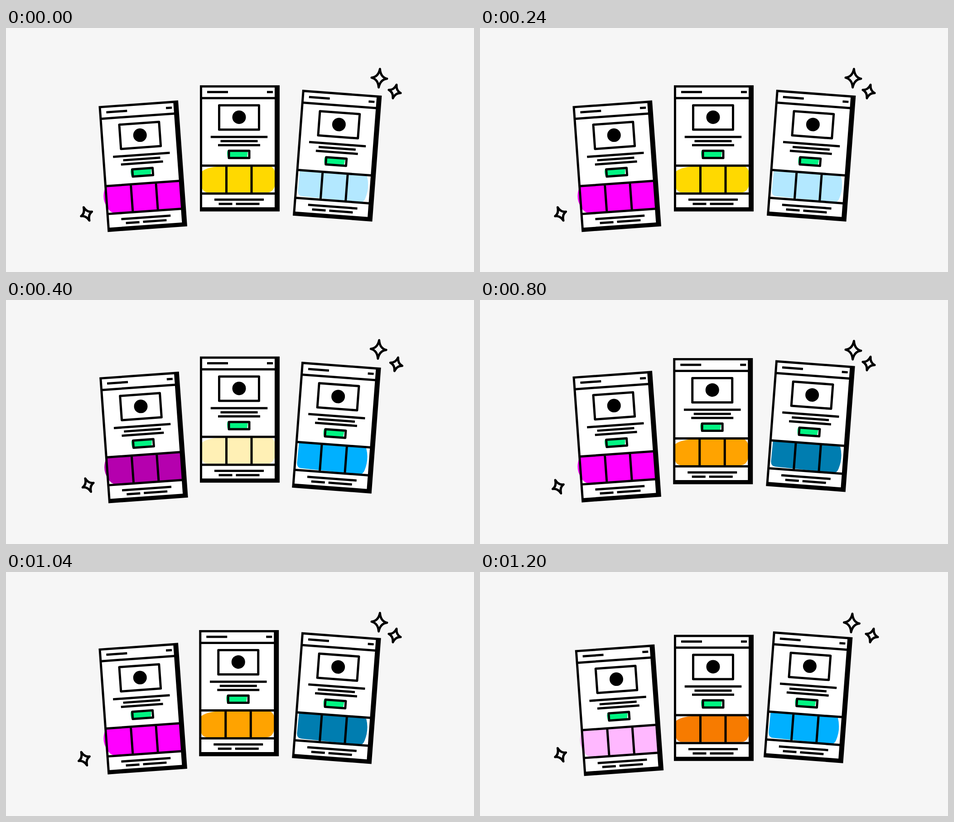
Recreate the animation shown at these times as an HTML page. Size 1033 px wide and 542 px high, loop 1600 ms.

```html
<!DOCTYPE html>
<html lang="en">
<head>
<meta charset="utf-8">
<title>Page templates</title>
<style>
  html, body { margin: 0; width: 100%; height: 100%; overflow: hidden; background: #f6f6f6; }
  svg { display: block; width: 100%; height: 100%; }
  .ink { fill: none; stroke: #000; stroke-width: 5; stroke-linejoin: round; }
</style>
</head>
<body>
<svg id="stage" viewBox="0 0 1033 542"></svg>
<script>
const STEP = 400;    // time per pose, ms
const UNIT = 1.75;   // size of one jitter unit, px
const W = 176, H = 280.4, MID = 86.5;
const stage = document.getElementById('stage');

function add(parent, tag, attrs = {}) {
  const node = document.createElementNS('http://www.w3.org/2000/svg', tag);
  for (const key in attrs) node.setAttribute(key, attrs[key]);
  return parent.appendChild(node);
}

const ink = (parent, d, extra) => add(parent, 'path', { class: 'ink', d, ...extra });
const bar = (y, w, x = MID - w / 2) => `M${x} ${y}h${w}`;
const box = (y, w, h) => bar(y, w) + `v${h}h${-w}z`;

// Four tips joined by curves that sag to the centre.
function starPath(rx, ry) {
  return `M0 ${-ry}Q0 0 ${rx} 0Q0 0 0 ${ry}Q0 0 ${-rx} 0Q0 0 0 ${-ry}Z`
    .replaceAll('Q0 0', () => 'Q' + sag.next().value);
}
const sag = (function* () {
  while (true) yield* ['2.5 -2.5', '2.5 2.5', '-2.5 2.5', '-2.5 -2.5'];
})();

function drawPage(card, blob) {
  add(card, 'rect', { x: 2, y: 2, width: W - 6, height: H - 6, fill: '#fff' });
  const fill = add(card, 'path', { d: blob });
  add(card, 'path', { d: `M0 0H${W}V${H}H0ZM5 5V271H165V5Z`, 'fill-rule': 'evenodd' });
  add(card, 'path', { d: 'M62 144Q58.5 148 61 160L104 161L106 146Z', fill: '#00f582' });

  let d = bar(15, 46, 16) + bar(15, 13, 148);
  for (const y of [28.5, 178.5, 240.5]) d += bar(y, 164, 3);
  for (const x of [58.5, 114]) d += `M${x} 178v63`;
  d += bar(114.7, 125.5) + bar(124, 82) + bar(133, 93) + bar(254, 109);
  ink(card, d + box(44.5, 88, 54) + box(145.5, 45, 16));
  ink(card, bar(263.5, 90), { 'stroke-dasharray': '30 8 52' });
  add(card, 'circle', { cx: MID, cy: 71, r: 15 });
  return fill;
}

function makeCard(x, y, turn, blob, tints, poses) {
  const node = add(stage, 'g');
  const fill = drawPage(node, blob);
  return { node, fill, tints, x, y, poses, local: `rotate(${turn}) translate(${-W / 2} ${-H / 2})` };
}

function makeStar(x, y, turn, rx, ry, poses) {
  return { node: ink(stage, starPath(rx, ry)), x, y, poses, local: `rotate(${turn})` };
}

// Poses are jitter offsets in units, after a first pose at rest.
const parts = [
  makeCard(302.2, 307, -4.1,
    'M3 179Q-10 204 3 226Q9 239 20 239H166V179Z',
    ['#ff00ff', '#b500ae', '#ff00ff', '#ffb8ff'], [[1, -1], [0, -2], [3, 0]]),
  makeCard(516, 267.4, 0,
    'M4 192Q14 182 45 180H157Q166 186 166 196V220Q163 238 148 238H16Q4 236 4 222Z',
    ['#ffd900', '#fff0b5', '#ffa300', '#f77b00'], [[0, -1], [-1, 1], [0, 7]]),
  makeCard(731.2, 283.5, 4.3,
    'M8 179L7 224Q7 236 18 236L145 240Q154 240 157 230Q165 205 157 181L125 178Z',
    ['#b3e8ff', '#00b0ff', '#007db0', '#00b0ff'], [[-1, 0], [-1, -2], [-4, -3]]),
  makeStar(824, 111.5, 4, 17, 20.5, [[-1, -1], [0, 0], [-2, 1]]),
  makeStar(858, 141, 15, 13.5, 15.5, [[2, 1], [0, 0], [4, 0]]),
  makeStar(177.7, 413, -23, 13, 16, [[2, -1], [-3, 1], [0, -4]])
];

function draw(time) {
  const step = Math.floor(time / STEP) % 4;
  for (const part of parts) {
    const [dx, dy] = step ? part.poses[step - 1] : [0, 0];
    part.node.setAttribute('transform',
      `translate(${part.x + dx * UNIT} ${part.y + dy * UNIT}) ${part.local}`);
    if (part.fill) part.fill.setAttribute('fill', part.tints[step]);
  }
}

const start = performance.now();
function tick() {
  draw(performance.now() - start);
  requestAnimationFrame(tick);
}
tick();
</script>
</body>
</html>
```
